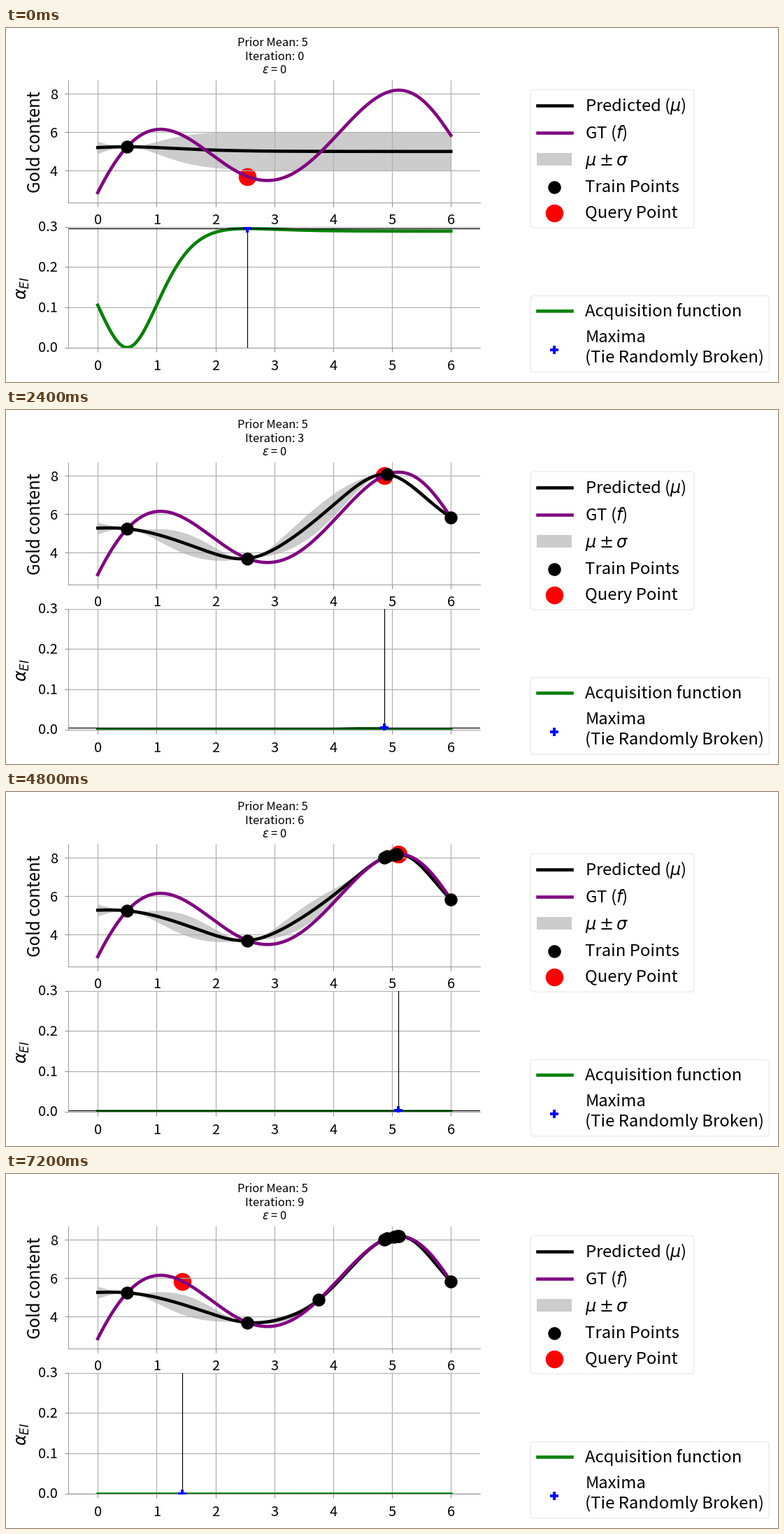
A matplotlib script for the animation above (8000 ms loop, 1104 by 507 pixels).

```python
import math

import numpy as np
import matplotlib.pyplot as plt
from matplotlib.animation import FuncAnimation
from matplotlib.patches import FancyBboxPatch, Rectangle

W, H, DPI = 1104, 507, 72  # at 72 dpi one point is one pixel
PRIOR = 5
LW = 4.6
TRAIN_SIZE, QUERY_SIZE, PLUS_SIZE = 18.5, 25.5, 12.5

plt.rcParams["font.family"] = "Noto Sans CJK JP"
plt.rcParams["mathtext.fontset"] = "dejavusans"


# --- Ground truth: a smooth polynomial through a few known values ---
POINTS = [(0, 2.857), (0.5, 5.241), (1.066, 6.149), (1.443, 5.84),
          (1.83, 5.085), (2.545, 3.69), (2.883, 3.488), (3.765, 4.92),
          (4.5, 7.2), (4.89, 8.045), (5.112, 8.19), (5.5, 7.72), (6, 5.84)]
EXTREMA = [1.066, 2.883, 5.112]
DEGREE = 9


def powers(x):
    return np.vander((np.atleast_1d(x) - 3) / 3, DEGREE + 1, increasing=True)


def fit_truth():
    px, py = np.array(POINTS).T
    t = (np.array(EXTREMA) - 3) / 3
    slopes = np.zeros((len(t), DEGREE + 1))
    for n in range(1, DEGREE + 1):
        slopes[:, n] = n * t ** (n - 1) / 3
    rows = np.vstack([powers(px), slopes])
    values = np.concatenate([py, np.zeros(len(t))])
    return np.linalg.lstsq(rows, values, rcond=None)[0]


COEF = fit_truth()


def truth(x):
    return powers(x) @ COEF


# --- Gaussian process with a Matern 5/2 kernel and expected improvement ---
def kernel(a, b):
    s = math.sqrt(5) * np.abs(a[:, None] - b[None, :])
    return (1 + s + s ** 2 / 3) * np.exp(-s)


def posterior(x, train):
    K = kernel(train, train) + 1e-10 * np.eye(len(train))
    k = kernel(x, train)
    mean = PRIOR + k @ np.linalg.solve(K, truth(train) - PRIOR)
    var = 1 - np.sum(k * np.linalg.solve(K, k.T).T, axis=1)
    return mean, np.maximum(var, 1e-9)


norm_cdf = np.vectorize(lambda z: 0.5 * math.erfc(-z / math.sqrt(2)))


def improvement(mean, spread, best):
    gain = mean - best
    z = gain / spread
    pdf = np.exp(-z ** 2 / 2) / math.sqrt(2 * math.pi)
    return np.maximum(gain * norm_cdf(z) + spread * pdf, 0)


# The first sample is given, the others are queried one per iteration.
SAMPLES = np.array([0.5, 2.543, 6, 4.913, 4.866, 5.036, 5.08,
                    5.104, 5.115, 3.757, 1.439])
STEPS = len(SAMPLES) - 1
xs = np.linspace(0, 6, 601)


# --- Stage ---
fig = plt.figure(figsize=(W / DPI, H / DPI), dpi=DPI, facecolor="white")


def add_axes(top, bottom, ylim, yticks):
    left, right = 89.1, 678.3
    ax = fig.add_axes([left / W, 1 - bottom / H,
                       (right - left) / W, (bottom - top) / H])
    ax.set(xlim=(-0.5, 6.5), ylim=ylim, xticks=range(7), yticks=yticks)
    ax.patch.set_visible(False)
    ax.set_axisbelow("line")
    ax.grid(color="#b0b0b0", lw=1.25)
    ax.tick_params(length=5.5, width=0.9, color="gray",
                   labelbottom=False, labelleft=False)
    for side in ("top", "right"):
        ax.spines[side].set_visible(False)
    for side in ("left", "bottom"):
        ax.spines[side].set(color="gray", linewidth=0.8)
    return ax


top_ax = add_axes(75.2, 249.6, (2.357, 8.69), [4, 6, 8])
low_ax = add_axes(284.6, 457.6, (0, 0.3), [0, 0.1, 0.2, 0.3])

# Overlay in pixel coordinates for all lettering and the legends
page = fig.add_axes([0, 0, 1, 1])
page.set(xlim=(0, W), ylim=(H, 0))
page.axis("off")


def label(x, y, text, size, ha="left", **kw):
    return page.text(x, y, text, fontsize=size, ha=ha, va="baseline", **kw)


TICK, TITLE, LEGEND = 20, 16.5, 23.9

for i in range(7):
    x = 131.4 + 84.17 * i
    label(x, 281.3, str(i), TICK, "center")
    label(x, 490.5, str(i), TICK, "center")
for i, value in enumerate((8, 6, 4)):
    label(74, 101.5 + 55.1 * i, str(value), TICK, "right")
for i in range(4):
    label(74, 464.5 - 57.7 * i, f"{i / 10:.1f}", TICK, "right")

upright = dict(rotation=90, rotation_mode="anchor")
label(49, 163.5, "Gold content", 24, "center", **upright)
label(30, 372.5, r"$\alpha_{EI}$", 24, "center", **upright)

label(381.5, 26, "Prior Mean: 5", TITLE, "center")
counter = label(384, 46, "", TITLE, "center")
label(383.7, 65.3, r"$\varepsilon$ = 0", TITLE, "center")


# --- Legends ---
def box(x0, y0, x1, y1):
    page.add_patch(FancyBboxPatch(
        (x0, y0), x1 - x0, y1 - y0, fc="white", ec="#e9e9e9", lw=1.2,
        boxstyle="round,pad=0,rounding_size=5"))


def key_line(y, color):
    page.plot([759.5, 809], [y, y], color=color, lw=LW,
              solid_capstyle="projecting")


def key_mark(y, marker, color, size):
    page.plot([784.3], [y], marker, color=color, ms=size, mew=0)


box(750, 88.3, 984, 286.3)
key_line(110.8, "black")
key_line(149.8, "purple")
page.add_patch(Rectangle((759.3, 179), 50, 17.6, fc="#cccccc", lw=0))
key_mark(228, "o", "black", TRAIN_SIZE)
key_mark(265.2, "o", "red", QUERY_SIZE)

box(750, 383.5, 1091.3, 493)
key_line(404.9, "green")
key_mark(460.5, "P", "blue", PLUS_SIZE)

for y, text in [(119, r"Predicted ($\mu$)"), (158, "GT ($f$)"),
                (196.5, r"$\mu \pm \sigma$"), (235, "Train Points"),
                (272.3, "Query Point"), (413.3, "Acquisition function"),
                (450, "Maxima"), (479, "(Tie Randomly Broken)")]:
    label(828.3, y, text, LEGEND)


# --- Moving parts ---
def curve(ax, color, width=LW):
    return ax.plot([], [], color=color, lw=width,
                   solid_capstyle="projecting")[0]


def marks(ax, marker, color, size, z):
    return ax.plot([], [], marker, color=color, ms=size, mew=0, zorder=z)[0]


band = top_ax.fill_between(xs, xs, xs, color="#cccccc", lw=0, zorder=1)
query = marks(top_ax, "o", "red", QUERY_SIZE, 1.2)
predicted = curve(top_ax, "black")
curve(top_ax, "purple").set_data(xs, truth(xs))
trained = marks(top_ax, "o", "black", TRAIN_SIZE, 10)

acquisition = curve(low_ax, "green")
across = low_ax.axhline(0, color="black", lw=1.2)
upward = low_ax.axvline(0, color="black", lw=1.2)
peak = marks(low_ax, "P", "blue", PLUS_SIZE, 10)


def update(step):
    train, pick = SAMPLES[:step + 1], SAMPLES[step + 1]
    observed = truth(train)
    mean, spread = posterior(xs, train)
    gain = improvement(mean, spread, observed.max())
    height = gain.max()

    counter.set_text(f"Iteration: {step}")
    band.set_verts([np.column_stack([
        np.concatenate([xs, xs[::-1]]),
        np.concatenate([mean + spread, (mean - spread)[::-1]])])])
    predicted.set_data(xs, mean)
    trained.set_data(train, observed)
    query.set_data([pick], truth(pick))

    acquisition.set_data(xs, gain)
    across.set_ydata([height, height])
    upward.set_xdata([pick, pick])
    peak.set_data([pick], [height])
    return (counter, band, predicted, trained, query,
            acquisition, across, upward, peak)


anim = FuncAnimation(fig, update, frames=STEPS, interval=800,
                     init_func=lambda: update(0), repeat=True,
                     repeat_delay=0, blit=False)
plt.show()
```
